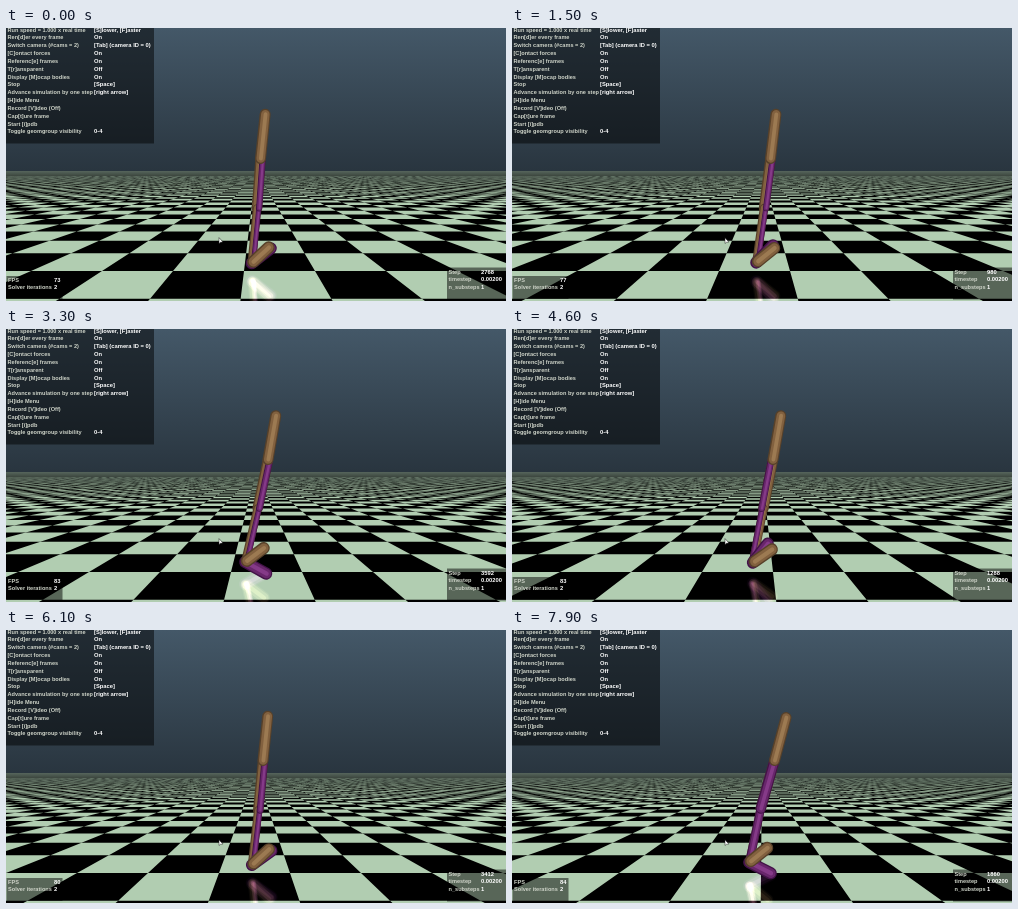
These frames come from a looping animation (500 by 273 pixels, 8 s). An HTML page with a canvas:

```html
<!DOCTYPE html>
<html lang="en">
<head>
<meta charset="utf-8">
<title>Walker simulation</title>
<style>
html, body { margin: 0; overflow: hidden; background: #000; }
canvas { display: block; }
</style>
</head>
<body>
<canvas id="stage" width="500" height="273"></canvas>
<script>
const ctx = document.getElementById('stage').getContext('2d');
const LOOP = 8000, HORIZON = 143, GROUND = 243, SQUARE = 71;
const STEP_RATE = 1.43, SCROLL_RATE = 0.95;
const RAD = Math.PI / 180;

// time, step, fps, scroll, hip x, torso, thigh, shin, tan foot, purple foot, purple side
// (angles in degrees; a drop in the step count is a hard reset)
const POSES = [
  [0, 2768, 73, 12, 254.5, 6, 4, 5.5, 43, 38, 0.8],
  [900, 120, 75, 0, 251, 0, 0, 0, 10, 0, 0.4],
  [1500, 980, 77, 398, 258.5, 7, 7.5, 8, 39, 46, 0.8],
  [2400, 2268, 82, 1232, 259.5, 9, 10, 10, 38, 2, 0.5],
  [3300, 3592, 83, 2013, 262, 10, 12, 13, 37, -29, 0.7],
  [3700, 0, 83, 0, 251, 0, 0, 0, 10, 0, 0.4],
  [4600, 1288, 83, 699, 261, 10, 11, 11, 35, 52, -0.7],
  [6100, 3412, 80, 2096, 257, 6, 5.5, 6.5, 43, 36, 0.7],
  [6600, 0, 82, 0, 251, 0, 0, 0, 10, 0, 0.4],
  [7900, 1860, 84, 1066, 262.5, 15, 16, 12, 39, -27, 0]
];

const TAN = ['#57412a', '#82613f', '#9c7a52'];
const PURPLE = ['#421347', '#68266b', '#853a88'];

const MENU = [
  ['Run speed = 1.000 x real time', '[S]lower, [F]aster'],
  ['Ren[d]er every frame', 'On'],
  ['Switch camera (#cams = 2)', '[Tab] (camera ID = 0)'],
  ['[C]ontact forces', 'On'],
  ['Referenc[e] frames', 'On'],
  ['T[r]ansparent', 'Off'],
  ['Display [M]ocap bodies', 'On'],
  ['Stop', '[Space]'],
  ['Advance simulation by one step', '[right arrow]'],
  ['[H]ide Menu', ''],
  ['Record [V]ideo (Off)', ''],
  ['Cap[t]ure frame', ''],
  ['Start [i]pdb', ''],
  ['Toggle geomgroup visibility', '0-4']
];

function stateAt(time) {
  let i = POSES.length - 1;
  while (POSES[i][0] > time) i--;
  const from = POSES[i], to = POSES[i + 1];
  const elapsed = time - from[0];
  if (!to || to[1] < from[1]) {
    const held = from.slice();
    held[1] += elapsed * STEP_RATE;
    held[3] += elapsed * SCROLL_RATE;
    return addStride(held, elapsed / 300);
  }
  const span = to[0] - from[0], u = elapsed / span;
  const settle = from[1] < 200 ? Math.min(1, elapsed / 500) : u;
  const mixed = from.map((v, k) => v + (to[k] - v) * (k < 4 ? u : settle));
  return addStride(mixed, u * Math.round(span / 300));
}

function addStride(pose, cycles) {
  const swing = Math.sin(2 * Math.PI * cycles);
  pose[7] += swing * 1.5;
  pose[8] += swing * 6;
  pose[9] -= swing * 10;
  return pose;
}

function drawSky() {
  const sky = ctx.createLinearGradient(0, 0, 0, HORIZON);
  sky.addColorStop(0, '#445868');
  sky.addColorStop(1, '#29353f');
  ctx.fillStyle = sky;
  ctx.fillRect(0, 0, 500, HORIZON);
}

function drawFloor(scroll) {
  ctx.fillStyle = '#000';
  ctx.fillRect(0, HORIZON, 500, 130);
  const depth = n => 100 / (1 + 0.2165 * n);
  const shift = scroll % (2 * SQUARE);
  ctx.fillStyle = '#b1cdb1';
  for (let n = -2; n < 90; n++) {
    const near = depth(n), far = depth(n + 1);
    const x = (k, d) => 250 + (k * SQUARE - shift) * d / 100;
    const reach = Math.ceil(25000 / far / SQUARE) + 3;
    ctx.beginPath();
    for (let k = -reach; k <= reach; k++) {
      if ((n + k) % 2 === 0) continue;
      ctx.moveTo(x(k, near), HORIZON + near);
      ctx.lineTo(x(k + 1, near), HORIZON + near);
      ctx.lineTo(x(k + 1, far), HORIZON + far);
      ctx.lineTo(x(k, far), HORIZON + far);
    }
    ctx.fill();
  }
  const haze = ctx.createLinearGradient(0, HORIZON, 0, HORIZON + 14);
  haze.addColorStop(0, 'rgba(86,101,92,1)');
  haze.addColorStop(0.3, 'rgba(86,101,90,.75)');
  haze.addColorStop(1, 'rgba(86,101,90,0)');
  ctx.fillStyle = haze;
  ctx.fillRect(0, HORIZON, 500, 14);
}

// A rounded limb, shaded with three nested strokes
function limb([x1, y1], [x2, y2], radius, colors, shift = 0) {
  ctx.lineCap = 'round';
  colors.forEach((color, i) => {
    const dx = shift + i * 0.2;
    ctx.strokeStyle = color;
    ctx.lineWidth = radius * [2, 1.55, 0.7][i];
    ctx.beginPath();
    ctx.moveTo(x1 + dx, y1);
    ctx.lineTo(x2 + dx, y2);
    ctx.stroke();
  });
}

function drawWalker([, , , , hipX, torso, thigh, shin, tanFoot, purpleFoot, side]) {
  const move = ([x, y], length, angle) =>
    [x + length * Math.sin(angle * RAD), y - length * Math.cos(angle * RAD)];
  const hip = [hipX, 130.5];
  const top = move(hip, 44.5, torso);
  const knee = move(hip, -50, thigh);
  const ankle = move(knee, -55, shin);
  const along = (length, angle) => move(ankle, length, 90 - angle);
  const strip = (a, b, radius) =>
    limb(a, b, radius * (1 - Math.abs(side) / 2), PURPLE, side * radius / 2);

  limb(hip, knee, 5.2, TAN);
  limb(knee, ankle, 4.2, TAN);
  strip(knee, ankle, 4.2);
  strip(hip, knee, 5.2);
  limb(top, hip, 5.5, TAN);
  limb(ankle, along(24, purpleFoot), 6.1, PURPLE);
  limb(along(2, tanFoot), along(23, tanFoot), 6.1, TAN);
}

function drawReflection(pose) {
  ctx.save();
  ctx.beginPath();
  ctx.rect(0, GROUND, 500, 30);
  ctx.clip();
  ctx.globalCompositeOperation = 'lighter';
  ctx.globalAlpha = 0.12;
  ctx.translate(0, 2 * GROUND + 2);
  ctx.scale(1, -1);
  drawWalker(pose);
  ctx.restore();
}

function panel(x, y, w, h, rows, firstY, valueX) {
  ctx.fillStyle = 'rgba(0,0,0,.5)';
  ctx.fillRect(x, y, w, h);
  ctx.textBaseline = 'middle';
  rows.forEach(([label, value], i) => {
    const rowY = firstY + i * 7.83;
    ctx.font = 'bold 5.6px "Liberation Sans", sans-serif';
    ctx.fillStyle = '#ced3c8';
    ctx.fillText(label, x + 1.5, rowY);
    ctx.font = 'bold 5.8px "Liberation Sans", sans-serif';
    ctx.fillStyle = '#fff';
    ctx.fillText(value, valueX, rowY);
  });
}

function drawCursor() {
  ctx.fillStyle = '#fff';
  ctx.strokeStyle = '#222';
  ctx.lineWidth = 0.5;
  ctx.beginPath();
  ctx.moveTo(213, 210);
  ctx.lineTo(213, 215.5);
  ctx.lineTo(214.5, 214.3);
  ctx.lineTo(216.7, 214);
  ctx.closePath();
  ctx.fill();
  ctx.stroke();
}

function draw(now) {
  let time = Math.floor(now % LOOP / 100) * 100;
  if ([800, 3600, 6500].includes(time)) time -= 100; // pause before each reset
  const pose = stateAt(time);
  drawSky();
  drawFloor(pose[3]);
  drawReflection(pose);
  drawWalker(pose);
  panel(0, 0, 148, 115.5, MENU, 2, 88);
  panel(0.5, 248, 56, 23, [
    ['FPS', Math.round(pose[2])],
    ['Solver iterations', 2]
  ], 252, 48);
  panel(441, 239.5, 59, 32, [
    ['Step', Math.round(pose[1] / 4) * 4],
    ['timestep', '0.00200'],
    ['n_substeps', 1]
  ], 244, 475);
  drawCursor();
}

const start = performance.now();
function tick() {
  draw(performance.now() - start);
  requestAnimationFrame(tick);
}
tick();
</script>
</body>
</html>
```
